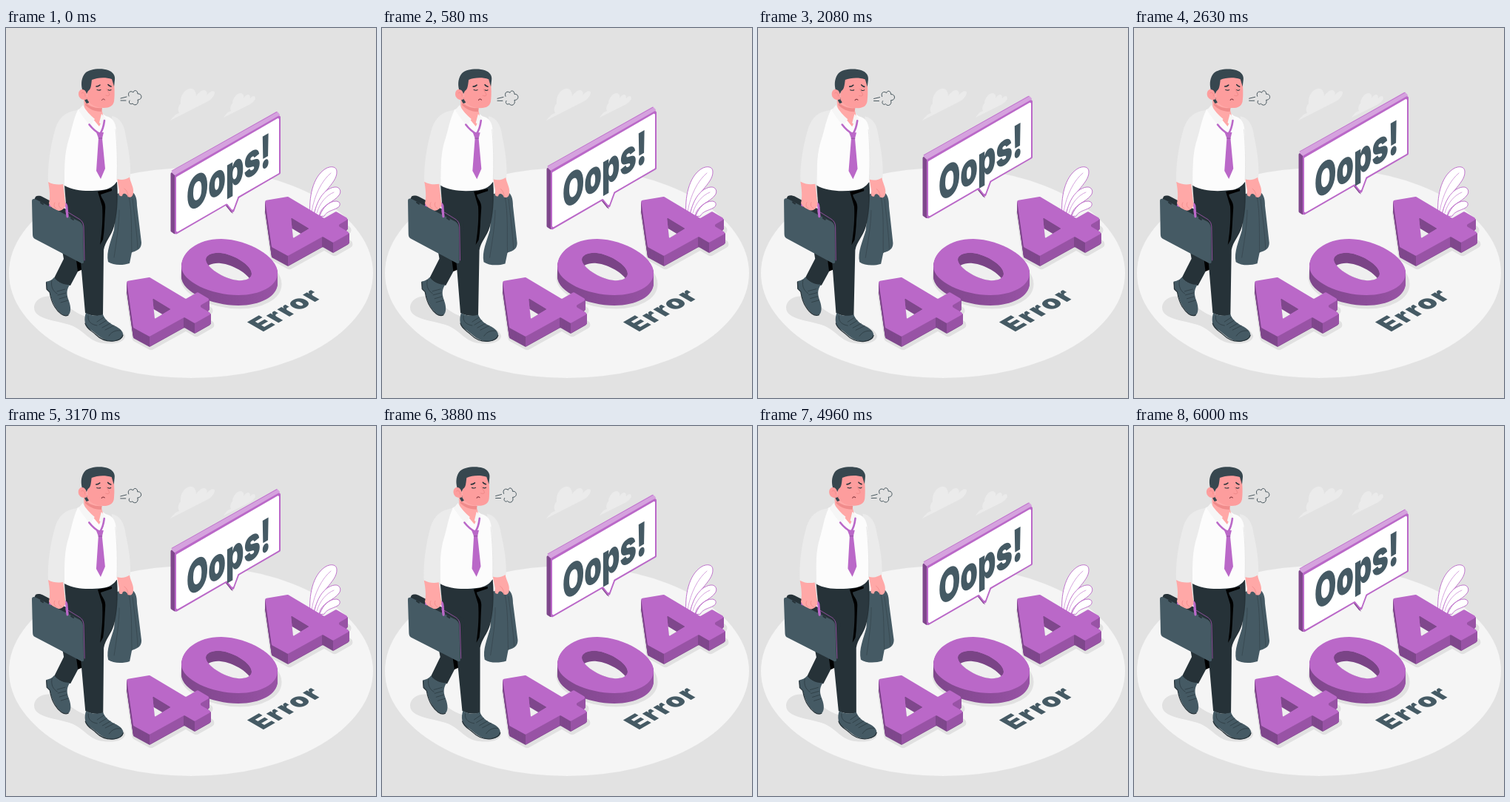
These frames come from a looping animation (500 by 500 pixels, 6040 ms). An HTML page with a canvas:

```html
<!DOCTYPE html>
<html lang="en">
<head>
<meta charset="utf-8">
<title>404</title>
<style>
html, body { margin: 0; width: 100%; height: 100%; overflow: hidden; background: #e2e2e2; }
canvas { display: block; width: 500px; height: 500px; }
</style>
</head>
<body>
<canvas id="stage"></canvas>
<script>
const LOOP = 6040;
const SIZE = 500;
const PURPLE = '#ba68c8', PURPLE_MID = '#9853a5', PURPLE_DARK = '#7f478c', PURPLE_LIGHT = '#d5a2de';
const SLATE = '#455a64', SLATE_DARK = '#37474f', NIGHT = '#263238';
const SKIN = '#ffa8a7', FACE = '#fd9d9d', SKIN_DARK = '#f08b8b', FLOOR = '#f5f5f5', SHADE = '#e1e1e1';

const canvas = document.getElementById('stage');
const ratio = window.devicePixelRatio || 1;
canvas.width = canvas.height = SIZE * ratio;
const ctx = canvas.getContext('2d');

function fill(shape, color) {
  ctx.fillStyle = color;
  ctx.fill(typeof shape === 'string' ? new Path2D(shape) : shape, 'evenodd');
}

function line(shape, color, width = 1) {
  ctx.strokeStyle = color;
  ctx.lineWidth = width;
  ctx.lineCap = ctx.lineJoin = 'round';
  ctx.stroke(typeof shape === 'string' ? new Path2D(shape) : shape);
}

// Closed polygon with softened corners
function poly(points, radius = 0) {
  const path = new Path2D();
  const n = points.length;
  const [ax, ay] = points[0], [bx, by] = points[n - 1];
  path.moveTo((ax + bx) / 2, (ay + by) / 2);
  points.forEach(([x, y], i) => {
    const [nx, ny] = points[(i + 1) % n];
    path.arcTo(x, y, (x + nx) / 2, (y + ny) / 2, radius);
  });
  path.closePath();
  return path;
}

function shifted(dx, dy, draw) {
  ctx.save();
  ctx.translate(dx, dy);
  draw();
  ctx.restore();
}

function extrude(path, depth, color) {
  for (let d = depth; d > 0; d--) shifted(0, d, () => fill(path, color));
}

function groundShadow(path, depth) {
  shifted(2, depth + 1, () => {
    fill(path, SHADE);
    line(path, SHADE, 7);
  });
}

// A hole shows its far walls, then the floor below
function hole(path, depth, wall) {
  ctx.save();
  ctx.clip(path);
  fill(path, wall);
  shifted(0, depth, () => fill(path, '#efefef'));
  ctx.restore();
}

const DEPTH = 14;
const FOUR = [[350, 233], [381, 228], [430, 257], [446, 248], [463, 258], [448, 267],
              [465, 277], [442, 290], [428, 282], [381, 308], [359, 296]];
const fourTop = poly(FOUR, 2);
const fourHole = poly([[385, 256], [410, 271], [388, 284]], 1);
const zeroTop = new Path2D('M237 322C237 303 258 285 291 285C328 286 367 309 367 331C367 349 343 361 314 361C278 361 237 343 237 322Z');
const zeroHole = new Path2D('M270 313C270 307 279 303 290 304C309 306 332 321 332 332C332 339 322 342 313 341C294 339 270 323 270 313Z');

function drawFour() {
  extrude(fourTop, DEPTH, PURPLE_DARK);
  FOUR.forEach(([x, y], i) => {
    const [nx, ny] = FOUR[(i + 1) % FOUR.length];
    if (nx >= x || ny <= y) return;
    fill(poly([[x - 1, y], [nx, ny], [nx, ny + DEPTH - 0.5], [x - 1, y + DEPTH]]), PURPLE_MID);
  });
  fill(fourTop, PURPLE);
  hole(fourHole, DEPTH, PURPLE_DARK);
}

function drawZero() {
  const side = ctx.createLinearGradient(237, 0, 367, 0);
  side.addColorStop(0, PURPLE_DARK);
  side.addColorStop(0.5, '#8a4b97');
  side.addColorStop(1, PURPLE_MID);
  extrude(zeroTop, DEPTH, side);
  fill(zeroTop, PURPLE);
  hole(zeroHole, DEPTH, '#7a4486');
}

const FIRST = [-187, 109];

function drawGround() {
  ctx.fillStyle = '#e2e2e2';
  ctx.fillRect(0, 0, SIZE, SIZE);
  ctx.fillStyle = FLOOR;
  ctx.beginPath();
  ctx.ellipse(250, 331, 246, 142, 0, 0, Math.PI * 2);
  ctx.fill();

  fill('M222 125C226 120 229 116 234 115C231 109 234 104 236 102C235 92 241 83 248 82C254 81 257 86 257 92C261 86 267 82 270 85C272 87 272 89 271 91C276 85 281 84 282 87C282 92 277 97 271 100Z', '#ebebeb');
  fill('M294 121C297 116 300 113 304 112C302 108 304 104 306 102C306 95 312 88 317 88C320 88 322 91 321 95C325 89 330 88 330 95C333 91 337 91 337 95C336 99 332 102 328 104Z', '#ebebeb');

  groundShadow(fourTop, DEPTH);
  shifted(...FIRST, () => groundShadow(fourTop, DEPTH));
  groundShadow(zeroTop, DEPTH);
  fill('M38 377C39 367 50 361 62 363C80 369 88 384 108 390C130 394 159 405 161 416C161 425 146 428 131 426C113 424 106 410 91 403C72 395 37 395 38 377Z', SHADE);

  ctx.save();
  ctx.transform(0.866, -0.5, 0.866, 0.5, 346.5, 411);
  ctx.font = '900 35px Inter, "Open Sans", sans-serif';
  ctx.letterSpacing = '1.9px';
  ctx.fillStyle = SLATE;
  ctx.fillText('Error', 0, 0);
  ctx.restore();
}

function drawPlant() {
  const leaves = [
    'M411 253C409 230 414 201 432 190C439 186 447 187 447 194C448 211 420 224 416 254Z',
    'M416 254C419 235 429 217 444 215C451 214 454 221 450 226C443 236 426 238 423 254Z',
    'M424 254C428 242 437 234 446 234C452 234 453 240 448 243C441 247 434 247 430 254Z'
  ];
  for (const leaf of leaves) {
    fill(leaf, '#fff');
    line(leaf, PURPLE, 0.9);
  }
  line('M413 248C417 225 427 206 439 196M420 250C424 236 433 226 443 222', PURPLE, 0.6);
}

function drawSign(lift) {
  const front = poly([[228, 199], [371, 117], [371, 197], [315, 229.5], [307, 251], [298, 239.5], [228, 280]], 2);
  const face = poly([[230, 201.5], [369, 121], [369, 196], [313.5, 228], [306.5, 247], [298.5, 237], [230, 276.5]], 1.5);
  shifted(0, -lift, () => {
    fill(poly([[222.5, 193], [230, 199], [230, 280], [222.5, 275]], 2), PURPLE_DARK);
    fill('M296 239L299 238L307 251L304 249Z', PURPLE_DARK);
    fill(poly([[222.5, 194], [366, 112.5], [371, 117.5], [229, 200]], 2), PURPLE_LIGHT);
    line('M224 193L366 113.5', PURPLE, 0.8);
    fill(front, PURPLE);
    fill(face, '#fff');
  });
}

function drawOops(lift) {
  ctx.save();
  ctx.transform(0.62, -0.358, 0, 1, 244, 250.6 - lift);
  ctx.font = '900 61px Inter, "Open Sans", sans-serif';
  ctx.fillStyle = SLATE;
  ctx.fillText('Oops!', 0, 0);
  ctx.restore();
}

function drawLegs() {
  // back leg and shoe
  fill('M74 290L78 312L65 338C71 345 79 348 87 348L104 316L116 270Z', NIGHT);
  fill('M95 314L107 308L104 326L97 329Z', '#000');
  fill('M54 343C58 342 62 341 65 337C71 345 79 347 86 347C81 355 82 361 85 369C88 377 88 385 84 388C78 391 71 384 66 376C62 369 60 362 59 357L55 353Z', SLATE);
  line('M54.5 344L55 353L59 357C60 363 62 371 66 377C71 385 78 391 84 388', NIGHT, 1.2);
  line('M62 341C60 350 64 356 69 359M69 356L80 353M70 361L81 358M72 366L82 363M74 371L84 368', NIGHT, 0.6);
  // front leg
  fill('M79 212L150 208C152 232 150 254 146 268C142 282 134 288 132 300L131 388C124 390 114 389 107 385L101 316C100 296 92 270 82 250Z', NIGHT);
  fill('M128 222L148 214C150 236 149 255 145 268C141 281 134 286 131 290C134 270 135 245 128 226Z', '#2b383f');
  fill('M124 221L143 217L143 220L128 225C129 232 136 234 134 247C133 261 133 274 131 286L127 293C130 274 131 254 130 241Z', '#000');
  // front shoe
  fill('M108 385C114 389 123 390 131 387C133 393 138 398 146 402C155 406 159 411 158 416C157 421 149 424 140 423C127 421 121 411 113 407C106 403 105 393 108 385Z', SLATE);
  line('M107 399C109 407 116 409 121 414C128 421 137 424 146 423C152 422 157 419 158 415', NIGHT, 1.2);
  line('M111 389C110 398 117 401 123 402M123 397L132 391M126 401L136 395M130 405L141 399M134 408L146 402M139 416C143 410 149 408 155 409', NIGHT, 0.6);
}

function drawJacket() {
  fill('M150 224L168 220C175 223 177 230 177 240L183 290C183 297 179 301 170 303L167 318C158 321 145 321 138 316C135 302 142 288 146 273Z', SLATE);
  line('M170 303C169 282 171 252 166 227M178 298C177 276 173 250 171 231M146 310C149 290 153 266 153 246', SLATE_DARK, 0.8);
  fill('M150 203L167 201C168 209 173 215 172 222C172 227 169 230 165 228C162 223 158 222 157 227C153 228 152 225 153 220Z', SKIN);
  line('M165 228C165 223 163 219 160 217', SKIN_DARK, 0.8);
}

function drawShirt() {
  fill('M143 119C154 121 160 130 162 147C166 165 169 184 168 201C162 205 156 206 150 204L146 150Z', '#ebebeb');
  fill('M100 109C93 112 87 119 84 132C78 155 79 184 79 213C93 221 113 221 130 219C139 218 146 214 150 207C151 180 150 155 149 138C148 127 144 121 135 119L124 111Z', '#fcfcfc');
  fill('M97 111C80 113 72 121 67 135C60 159 56 185 57 209C64 213 72 213 79 212C79 186 79 168 85 150C89 137 91 123 97 111Z', '#ebebeb');
  line('M150 205C151 181 150 156 148 137', '#e3e3e3', 0.8);
  // neck and open collar
  fill('M105 96L106 109L126 133L132 121L128 105Z', SKIN);
  fill('M108 101C113 106 121 109 130 108L129 113C119 113 112 109 107 104Z', SKIN_DARK);
  fill('M104 104L98 111C103 118 108 126 114 132L120 123C114 118 108 112 104 104Z', '#f6f6f6');
  fill('M129 116L126 128L131 132L135 122Z', '#f6f6f6');
  // tie
  line('M112.5 130.5C116 135 121 140 127 143C130 139 132 133 133 125', PURPLE, 2.6);
  fill('M122 141L132 141L130 149L134 190L128 204L122 193L125 149Z', PURPLE);
  line('M125 149L130 149', PURPLE_DARK, 0.7);
}

function drawCase() {
  fill('M40 228C43 226 47 227 49 228L108 259C111 261 111 263 111 267L107 316L104 319L39 284L36 236Z', NIGHT);
  line('M59 244L60 238L78 237C81 237 82 239 82 243L83 255', PURPLE, 3.2);
  fill('M57 208C64 212 71 212 77 211C78 219 79 227 80 235C82 241 78 246 72 247C66 247 61 243 58 237C60 229 59 218 57 208Z', SKIN);
  line('M66 236C64 239 65 243 68 244M72 236C70 239 72 243 75 244', SKIN_DARK, 0.8);
  fill('M35 234C35 231 37 230 41 232L98 261C102 263 104 266 104 271L105 316C105 318 104 318 102 318L39 285C37 284 36 282 36 279Z', SLATE);
  line('M82 247L83 255', PURPLE, 3);
  line('M84 249L97 257C103 260 105 264 105 270L106 314', PURPLE_MID, 0.9);
  line('M47 236L50 238M88 257L91 259', NIGHT, 2);
}

function drawHead() {
  fill('M106 94L112 94L112 101L109 102C107 100 106 97 106 94Z', SLATE_DARK);
  fill('M109 70C119 64 136 63 145 68C147 79 147 91 146 99C145 105 140 108 132 108C122 108 114 104 110 97Z', FACE);
  fill('M109 83C104 81 98 83 98 89C98 95 104 99 110 96Z', FACE);
  line('M102 88C104 86 107 88 107 92', SKIN_DARK, 0.9);
  fill('M103 83C101 75 102 67 107 61C113 55 129 54 138 57C144 59 148 64 147 70L146 79L143 69C134 66 123 67 116 70C115 77 115 83 111 85L109 89C108 85 106 83 103 83Z', SLATE_DARK);
  line('M122 79C124 79 126 78 127 77M138 76.5C139 78 140 78.5 142 79', NIGHT, 1.6);
  line('M123 83.5C125 84.2 127 84.2 128 83.5M138 83.5C139 84.2 141 84.2 142 83.5', NIGHT, 1.1);
  line('M136 82C137 86 140 88 140 90C139 92 137 92 135 91', SKIN_DARK, 1);
  line('M129.5 97.5C130.5 95.5 132 95.5 133.5 97', '#7c3038', 1);
}

function drawSigh() {
  line('M155 95L163 93M155 98L162 98M166 92C164 87 168 84 172 87C173 83 178 84 178 89C184 88 185 97 178 97C180 103 174 106 171 102C168 104 165 101 167 98', SLATE_DARK, 0.9);
}

function drawMan(angle) {
  ctx.save();
  ctx.translate(109, 240);
  ctx.rotate(angle * Math.PI / 180);
  ctx.translate(-109, -240);
  drawJacket();
  drawLegs();
  drawShirt();
  drawCase();
  drawHead();
  drawSigh();
  ctx.restore();
}

// 0 at the ends of the loop, 1 in the middle, a little quicker up than down
const rise = p => 1 - Math.abs(1 - 2 * p) + 0.04 * Math.sin(2 * Math.PI * p);
// 0, then 1 at a quarter, -1 at three quarters, back to 0
const sway = p => p < 0.25 ? 4 * p : p < 0.75 ? 2 - 4 * p : 4 * p - 4;

function draw(now) {
  const p = (now % LOOP) / LOOP;
  ctx.setTransform(ratio, 0, 0, ratio, 0, 0);
  drawGround();
  drawSign(29.5 * rise(p));
  drawOops(20 * rise(p));
  drawPlant();
  drawFour();
  drawZero();
  shifted(...FIRST, drawFour);
  drawMan(sway(p));
}

let start;
function tick(now) {
  if (start === undefined) start = now;
  draw(now - start);
  requestAnimationFrame(tick);
}
draw(0);
requestAnimationFrame(tick);
</script>
</body>
</html>
```
